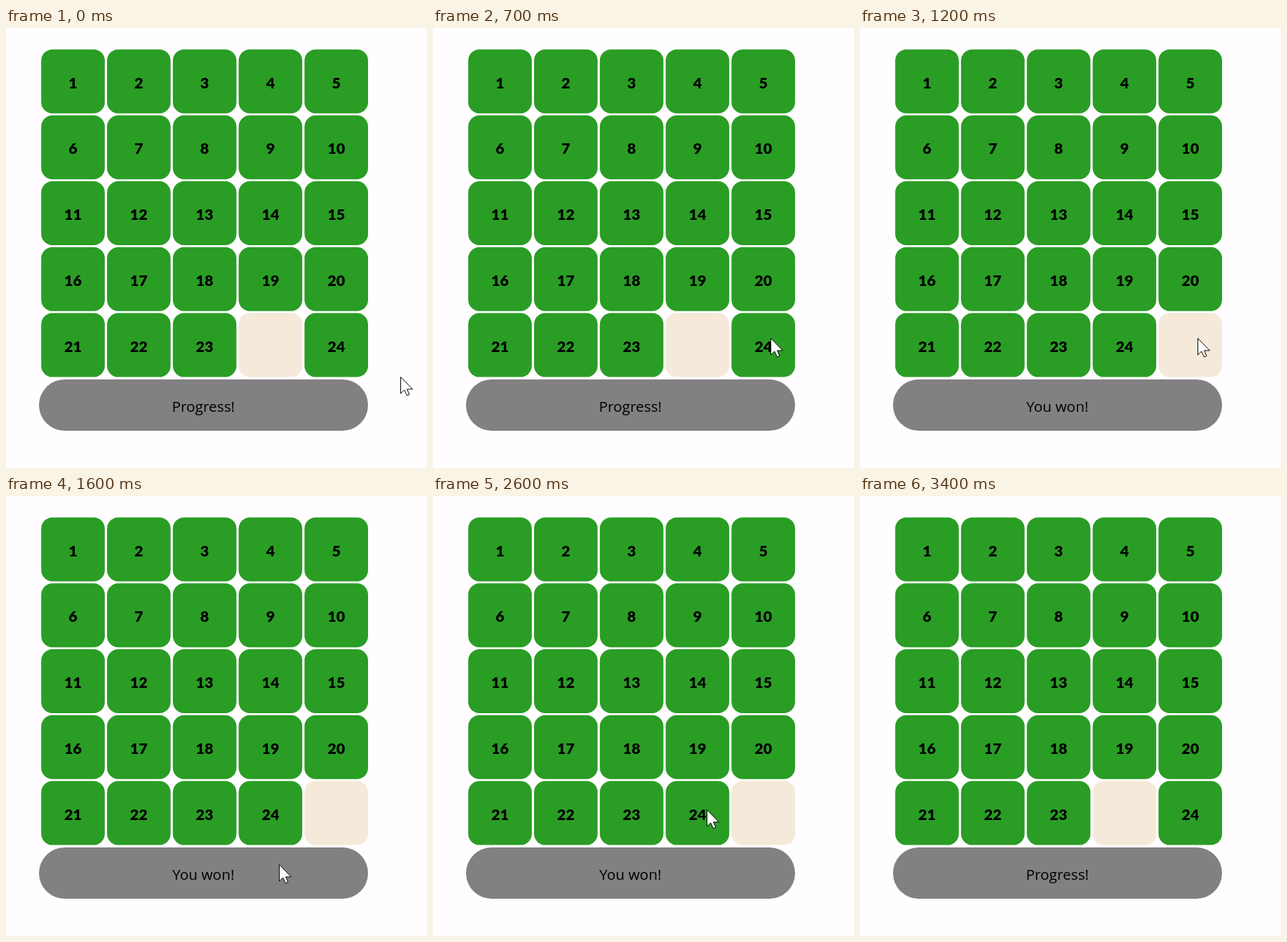
Write an HTML page that moves like this. It is 600 px wide and 626 px high and loops after 3500 ms.

```html
<!DOCTYPE html>
<html lang="en">
<head>
<meta charset="utf-8">
<title>Sliding puzzle</title>
<style>
  html, body { margin: 0; width: 100%; height: 100%; overflow: hidden; background: #fffdff; }
  svg { display: block; width: 600px; height: 626px; }
  text { text-anchor: middle; fill: #000; }
  .tile rect { fill: #2a9d25; }
  .tile text { font: 900 21.5px Lato, "Open Sans", sans-serif; }
  .blank rect { fill: #f5e9d9; }
  .bar { fill: #828082; }
  .message { font: 20.8px "Open Sans", "Noto Sans", sans-serif; }
  .cursor { fill: #fff; stroke: #000; }
  .solved .last { transform: translateX(-93.8px); }
  .solved .blank { transform: translateX(93.8px); }
</style>
</head>
<body>
<svg id="stage" viewBox="0 0 600 626">
  <g id="board"></g>
  <rect class="bar" x="47" y="500" width="469" height="73" rx="36.5"/>
  <text class="message" id="message" x="281.3" y="545.5">Progress!</text>
  <path class="cursor" id="cursor" d="M.5 .5V24L5.7 19L9.5 27L13 25.5L9.6 17.9H17.4Z"/>
</svg>
<script>
  const NS = "http://www.w3.org/2000/svg";
  const [stage, board, message, cursor] =
    ["stage", "board", "message", "cursor"].map(id => document.getElementById(id));
  const pitch = 93.8, width = 90.6, height = 91;
  const loop = 3500, tick = 100;
  const solvedAt = 1200, undoneAt = 2700, goneAt = 3300;

  // Pointer stops: time, x, y
  const stops = [
    [0, 562, 496], [600, 481, 441],
    [1200, 481, 441], [1800, 357, 553],
    [2000, 355, 556], [2600, 390, 446],
    [2700, 392, 447], [3000, 392, 447],
    [3200, 485, 522], [loop, 485, 522]
  ];

  function add(parent, name, attrs) {
    const node = document.createElementNS(NS, name);
    for (const key in attrs) node.setAttribute(key, attrs[key]);
    return parent.appendChild(node);
  }

  function addCell(slot, className, label) {
    const x = 50.2 + slot % 5 * pitch;
    const y = 30.4 + Math.floor(slot / 5) * pitch;
    const cell = add(board, "g", { class: className });
    add(cell, "rect", { x, y, width, height, rx: 16 });
    if (label) add(cell, "text", { x: x + width / 2, y: y + 55.2 }).textContent = label;
  }

  const ease = p => p * p * (3 - 2 * p);

  function pointerAt(t) {
    const next = stops.findIndex(stop => stop[0] > t);
    const [t0, x0, y0] = stops[next - 1];
    const [t1, x1, y1] = stops[next];
    const p = ease((t - t0) / (t1 - t0));
    return [x0 + (x1 - x0) * p, y0 + (y1 - y0) * p].map(Math.round);
  }

  function draw(t) {
    const solved = t >= solvedAt && t < undoneAt;
    stage.classList.toggle("solved", solved);
    message.textContent = solved ? "You won!" : "Progress!";
    cursor.setAttribute("transform", `translate(${pointerAt(t)})`);
    cursor.style.visibility = t < goneAt ? "visible" : "hidden";
  }

  for (let n = 1; n <= 23; n++) addCell(n - 1, "tile", n);
  addCell(23, "blank");
  addCell(24, "tile last", 24);
  draw(0);

  let start;
  function run(now) {
    start ??= now;
    // A small lead keeps each change on time despite display refresh delay.
    const t = (now - start + 10) % loop;
    draw(Math.floor(t / tick) * tick);
    requestAnimationFrame(run);
  }
  requestAnimationFrame(run);
</script>
</body>
</html>
```
